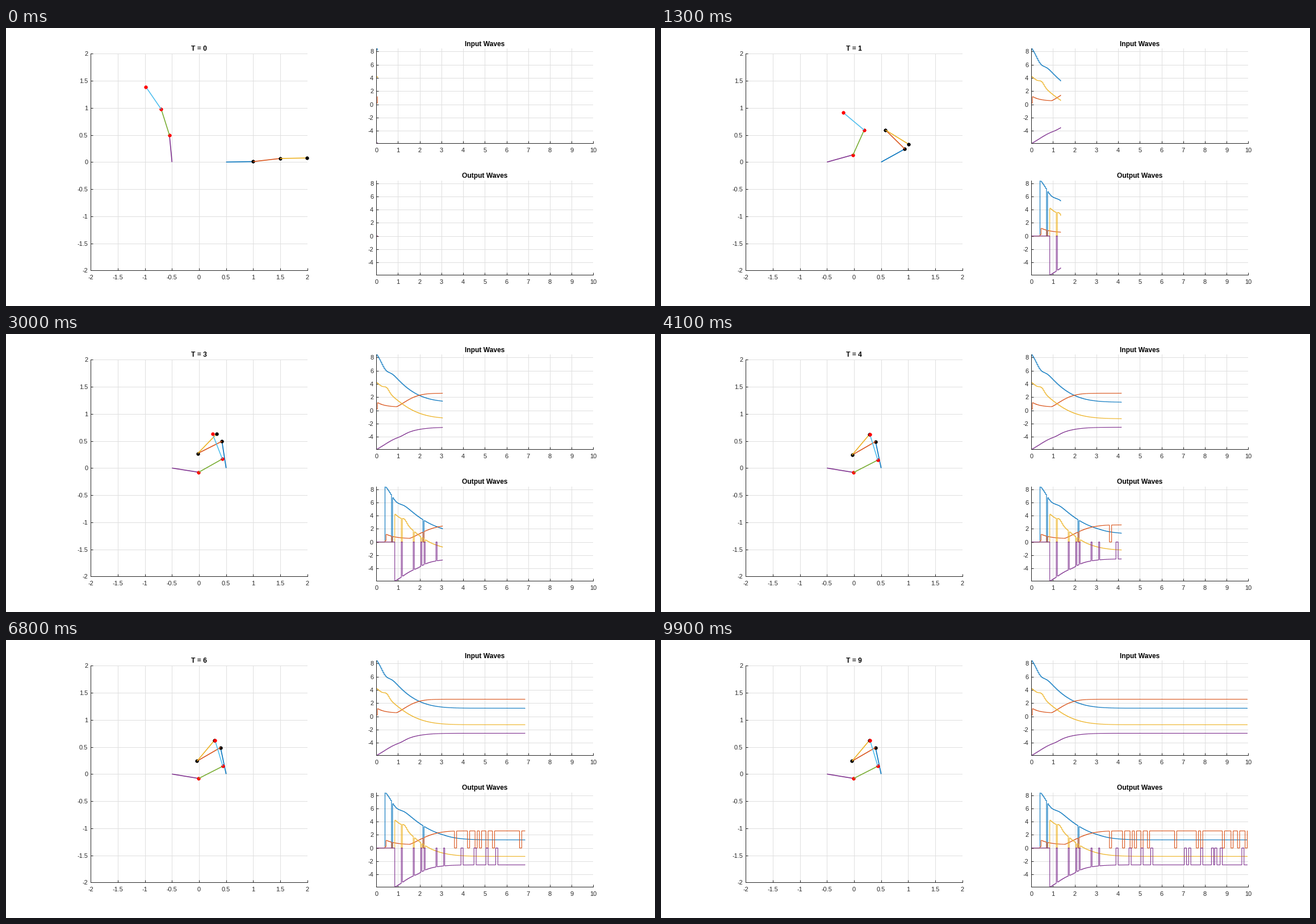
Write a matplotlib script that moves like this. It is 1143x490 px and loops after 10 s.

```python
import numpy as np
import matplotlib.pyplot as plt
from matplotlib.animation import FuncAnimation

W, H, DPI = 1143, 490, 64
PX = 72 / DPI  # points per pixel
FRAMES, STEP = 100, 0.05

BLUE, ORANGE, YELLOW = "#0072BD", "#D95319", "#EDB120"
PURPLE, GREEN, CYAN = "#7E2F8E", "#77AC30", "#4DBEEE"
INK, GRID = "#262626", "#DFDFDF"

plt.rcParams.update({
    "font.family": "Liberation Sans",
    "font.size": 11 * PX,
    "axes.unicode_minus": False,
})


def settle(t, start, end, rate, curve, bump=0, at=0, width=1):
    """Ease from start to end, with an optional bell-shaped detour."""
    gap = (start - end) * np.exp(-rate * t - curve * t * t)
    return end + gap + bump * np.exp(-((t - at) / width) ** 2)


# ---- waves -----------------------------------------------------------------
def blue_wave(t):
    return settle(t, 8.5, 1.23, 0.535, 0.235, -0.75, 0.4, 0.25)


def orange_wave(t):
    kick = np.where(t > 0, 0.75 * np.exp(-t / 0.35), -0.3)
    return kick + settle(np.maximum(t - 0.92, 0), 0.5, 2.59, 0.86, 0.94)


def yellow_wave(t):
    return settle(t, 4.2, -1.27, 0.467, 0.25, 0.5, 0.45, 0.16)


def purple_wave(t):
    return settle(t, -5.9, -2.56, 0.56, 0.32, -0.15, 1.1, 0.3)


def right_delay(t):
    return np.clip(0.4 + 0.19 * (t - 0.45), 0.4, 0.9)


def left_delay(t):
    return np.clip(0.85 - 0.06 * (t - 0.85), 0.75, 0.85)


# Step at which each packet loss begins
LOST_RIGHT = [14, 43]
LOST_LEFT = [23, 34, 41, 44]
LOST_ORANGE = [72, 84, 91, 95, 101, 107, 132, 152, 156, 176, 184, 190, 197]
LOST_PURPLE = [55, 62, 78, 90, 101, 110, 141, 145, 156, 166, 169, 174, 194]

CHANNELS = [
    (BLUE, blue_wave, right_delay, LOST_RIGHT),
    (ORANGE, orange_wave, right_delay, LOST_RIGHT + LOST_ORANGE),
    (YELLOW, yellow_wave, left_delay, LOST_LEFT),
    (PURPLE, purple_wave, left_delay, LOST_LEFT + LOST_PURPLE),
]

steps = np.arange(2 * FRAMES)
time = steps * STEP


def received(wave, delay, lost):
    sent = np.round(time - delay(time), 6)
    out = np.where(sent >= 0, wave(np.maximum(sent, 0)), 0)
    for first in lost:
        length = 1 if first < 70 else 2
        out[first:first + length] = 0
    return out


# ---- arms ------------------------------------------------------------------
LINK = 0.5


def right_angles(t):
    first = settle(t, 1.5, 102, -0.034, 0.398, -28, 1, 0.5)
    mean = settle(t, 0, 130, -0.214, 0.467, 20, 0.45, 0.35)
    half = settle(t, 2.7, 80, 2.28, 0, 10, 1.7, 0.75)
    return first, mean + half, mean - half


def left_angles(t):
    first = settle(t, 95.4, -9.3, 0.555, 0.425)
    mean = settle(t, 114.2, 66.9, -0.26, 0.377, 11, 0.6, 0.45)
    half = settle(t, 8.4, 40, 0.37, 0.84, 3.5, 2, 0.9)
    return first, mean - half, mean + half


def joints(base, angles):
    a = np.radians(angles)
    x = base + LINK * np.cumsum(np.r_[0, np.cos(a)])
    y = LINK * np.cumsum(np.r_[0, np.sin(a)])
    return x, y


# ---- figure ----------------------------------------------------------------
fig = plt.figure(figsize=(W / DPI, H / DPI), dpi=DPI, facecolor="white")


def make_axes(x0, y0, x1, y1, xlim, ylim, xticks, yticks):
    ax = fig.add_axes([x0 / W, 1 - y1 / H, (x1 - x0) / W, (y1 - y0) / H])
    ax.set(xlim=xlim, ylim=ylim, xticks=xticks, yticks=yticks)
    for axis in (ax.xaxis, ax.yaxis):
        axis.set_major_formatter(lambda v, _: f"{v:g}")
    ax.set_axisbelow(True)
    ax.grid(True, color=GRID, lw=PX)
    ax.tick_params(direction="in", length=4 * PX, width=PX, color=INK, labelcolor=INK)
    ax.tick_params(axis="x", pad=7.5 * PX)
    ax.tick_params(axis="y", pad=5 * PX)
    for side, spine in ax.spines.items():
        spine.set(visible=side in ("left", "bottom"), color=INK, lw=PX)
    return ax


def title(x, baseline, text):
    return fig.text(x / W, 1 - baseline / H, text, ha="center", va="baseline",
                    weight="bold", size=12 * PX, color="black")


half_ticks = np.arange(-2, 2.1, 0.5)
arm_ax = make_axes(149.3, 45.2, 530.7, 427.4, (-2, 2), (-2, 2), half_ticks, half_ticks)
wave_box = dict(xlim=(0, 10), ylim=(-5.9, 8.43),
                xticks=range(11), yticks=range(-4, 9, 2))
in_ax = make_axes(652.2, 36.4, 1034.4, 203.3, **wave_box)
out_ax = make_axes(652.2, 268.6, 1034.4, 435.2, **wave_box)

clock = title(340, 40, "T = 0")
title(843, 31.8, "Input Waves")
title(843, 264.2, "Output Waves")


def make_wave(ax, color, values):
    line, = ax.plot([], [], color=color, lw=1.1 * PX, drawstyle="steps-post",
                    solid_joinstyle="miter", snap=False)
    return line, values


def make_arm(colors, joint_color):
    parts = []
    for c in colors:
        link, = arm_ax.plot([], [], color=c, lw=1.6 * PX, clip_on=False,
                            solid_capstyle="butt")
        dot, = arm_ax.plot([], [], ls="none", marker=(8, 2, 0), ms=6 * PX,
                           mew=1.5 * PX, color=joint_color, clip_on=False)
        parts.append((link, dot))
    return parts


waves = []
for color, wave, delay, lost in CHANNELS:
    waves.append(make_wave(in_ax, color, wave(time)))
    waves.append(make_wave(out_ax, color, received(wave, delay, lost)))

arms = [
    (make_arm((BLUE, ORANGE, YELLOW), "black"), LINK, right_angles),
    (make_arm((PURPLE, GREEN, CYAN), "red"), -LINK, left_angles),
]


def update(n):
    clock.set_text(f"T = {n // 10}")
    for parts, base, angles in arms:
        x, y = joints(base, angles(n / 10))
        for i, (link, dot) in enumerate(parts):
            link.set_data(x[i:i + 2], y[i:i + 2])
            dot.set_data(x[i + 1:i + 2], y[i + 1:i + 2])
    count = 2 * n + 2
    for line, values in waves:
        line.set_data(time[:count], values[:count])
    return []


anim = FuncAnimation(fig, update, frames=FRAMES, interval=100, repeat=True, repeat_delay=0)
plt.show()
```
